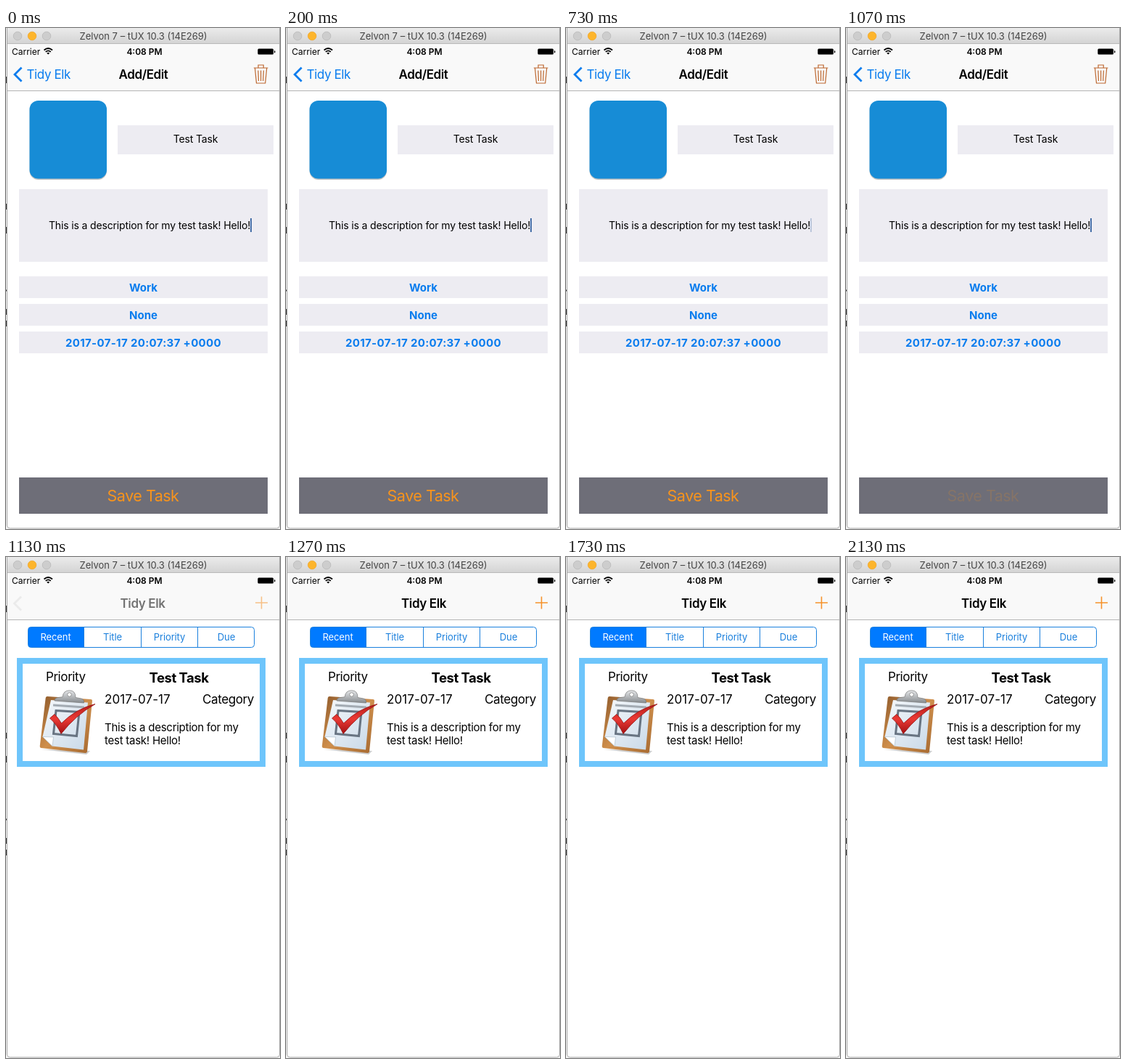
Recreate the animation shown at these times as an HTML page. Size 378x690 px, loop 2.19 s.

```html
<!DOCTYPE html>
<html lang="en">
<head>
<meta charset="utf-8">
<title>Task editor</title>
<style>
  html, body { margin: 0; width: 100%; height: 100%; overflow: hidden; background: #fff; }
  svg { display: block; width: 378px; height: 690px; font-family: Inter, Roboto, sans-serif; }
  .mid { text-anchor: middle; }
  .end { text-anchor: end; }
  .nav { font-size: 17px; letter-spacing: -.4px; }
  .strong { font-weight: 600; }
  .body { font-size: 14px; letter-spacing: -.14px; }
  .pick { font-size: 15px; font-weight: 700; fill: #087cee; }
  .field { fill: #edecf2; }
  .tab { font-size: 13px; letter-spacing: -.1px; fill: #1a7fdc; }
  .cell { font-size: 17px; letter-spacing: -.4px; }
  .note { font-size: 15px; letter-spacing: -.25px; }

  .loop { animation: 2190ms step-end infinite; }
  #form { animation-name: form; }
  #list { animation-name: list; }
  #save { animation-name: press; }
  #page { animation-name: slide; }
  #title { animation-name: title; }
  #add { animation-name: add; }
  #ghost { animation-name: ghost; }
  #caret { animation-name: caret; animation-timing-function: linear; }

  @keyframes form { 0% { visibility: visible; } 51.598%, 100% { visibility: hidden; } }
  @keyframes list { 0% { visibility: hidden; } 51.598%, 100% { visibility: visible; } }
  @keyframes press { 0% { opacity: 1; } 48.858%, 100% { opacity: .18; } }
  @keyframes caret {
    0%, 9.13% { opacity: 1; }
    18.26% { opacity: .12; }
    21.46%, 30.6% { opacity: 0; }
    39.7%, 100% { opacity: 1; }
  }
  /* tail of the pop transition */
  @keyframes slide {
    0% { transform: translateX(-3px); }
    54.795% { transform: translateX(-1px); }
    57.991%, 100% { transform: none; }
  }
  @keyframes title {
    0% { opacity: .54; transform: translateX(-1.5px); }
    54.795% { opacity: .88; transform: translateX(-.5px); }
    57.991%, 100% { opacity: 1; transform: none; }
  }
  @keyframes add { 0% { opacity: .55; } 54.795% { opacity: .88; } 57.991%, 100% { opacity: 1; } }
  @keyframes ghost { 0% { opacity: .08; } 54.795%, 100% { opacity: 0; } }
</style>
</head>
<body>
<svg viewBox="0 0 378 690">
  <defs>
    <linearGradient id="bar" x2="0" y2="1">
      <stop stop-color="#ebebeb"/><stop offset="1" stop-color="#d3d3d3"/>
    </linearGradient>
    <linearGradient id="wood" x2="1" y2="1">
      <stop stop-color="#8f5a2b"/><stop offset=".5" stop-color="#cf8f4c"/><stop offset="1" stop-color="#a5682f"/>
    </linearGradient>
    <linearGradient id="paper" x2="1" y2="1">
      <stop stop-color="#f5f8fb"/><stop offset="1" stop-color="#c9d9e8"/>
    </linearGradient>
    <linearGradient id="metal" x2="0" y2="1">
      <stop stop-color="#e6e8ea"/><stop offset="1" stop-color="#85898d"/>
    </linearGradient>
    <linearGradient id="red" x2="0" y2="1">
      <stop stop-color="#b81c1a"/><stop offset=".5" stop-color="#ea3a35"/><stop offset="1" stop-color="#a31012"/>
    </linearGradient>
  </defs>

  <!-- desktop slivers and window -->
  <rect width="378" height="690" fill="#f6f6f6"/>
  <path d="M0 67v9M0 242v8M0 274v9M0 361.5h1M0 387v8M0 403v8" stroke="#333" stroke-width="2"/>
  <rect x="1.5" y="-4" width="376" height="693" rx="4" fill="#fff" stroke="#a9a9a9"/>
  <rect x="2" width="375" height="22" fill="url(#bar)"/>
  <path d="M2 21.5h375" stroke="#b9b9b9"/>
  <g stroke-width=".8">
    <circle cx="16" cy="11" r="5.8" fill="#cdcdcd" stroke="#b9b9b9"/>
    <circle cx="36" cy="11" r="5.8" fill="#fdb52c" stroke="#f0a82c"/>
    <circle cx="56" cy="11" r="5.8" fill="#cdcdcd" stroke="#b9b9b9"/>
  </g>
  <text class="mid" x="189.5" y="16" font-size="13" fill="#454545">Zelvon 7 – tUX 10.3 (14E269)</text>

  <!-- status and navigation bars -->
  <rect x="2" y="22" width="375" height="64" fill="#f9f9f9"/>
  <path d="M2 86.5h375" stroke="#b4b4b4"/>
  <text x="8" y="36.5" font-size="12">Carrier</text>
  <path d="M52.5 30.5Q58.2 25.5 64 30.5M54.7 32.9Q58.2 29.9 61.8 32.9" fill="none" stroke="#000" stroke-width="1.7"/>
  <path d="M58.2 36.5l-2-2q2-1.6 4 0z"/>
  <text class="mid strong" x="191" y="36.5" font-size="12">4:08 PM</text>
  <rect x="347.3" y="28.4" width="21.7" height="8.2" rx="1.5"/>
  <path d="M370 31v3.5q1.5-.3 1.5-1.75T370 31"/>

  <g id="form" class="loop">
    <path d="M21.5 54.5L12 64l9.5 9.5" fill="none" stroke="#087cee" stroke-width="2.8"/>
    <text class="nav" x="28.5" y="70" fill="#087cee">Tidy Elk</text>
    <text class="nav strong mid" x="189.5" y="70">Add/Edit</text>
    <g fill="none" stroke="#bd672f" stroke-width="1.2">
      <path d="M341.8 55h19.6M348 54.5v-3.5h7.2v3.5M343.5 55.5l2 20.5h12.200l2-20.5"/>
      <path d="M347.800 58.5l.7 14.5M351.600 58.5V73M355.400 58.5l-.7 14.5"/>
    </g>

    <rect x="32.5" y="101.5" width="106.5" height="107.5" rx="12" fill="#999" opacity=".6"/>
    <rect x="32.5" y="100" width="106.5" height="107.5" rx="12" fill="#178cd6"/>

    <g class="field">
      <rect x="154" y="134" width="215" height="40"/>
      <rect x="18" y="222" width="343" height="100"/>
      <rect x="18" y="342" width="343" height="30"/>
      <rect x="18" y="380" width="343" height="30"/>
      <rect x="18" y="418" width="343" height="30"/>
    </g>
    <text class="body mid" x="261.5" y="158">Test Task</text>
    <text class="body mid" x="198" y="276.5">This is a description for my test task! Hello!</text>
    <rect id="caret" class="loop" x="337" y="262" width="2" height="19" fill="#466fa8"/>
    <g class="pick mid">
      <text x="189.5" y="362.5">Work</text>
      <text x="189.5" y="400.5">None</text>
      <text x="189.5" y="438.5" letter-spacing=".35">2017-07-17 20:07:37 +0000</text>
    </g>
    <rect x="18" y="619" width="343" height="50" fill="#6e6e78"/>
    <text id="save" class="loop mid" x="189" y="652" font-size="21.5" letter-spacing="-.5" fill="#f8941c">Save Task</text>
  </g>

  <g id="list" class="loop">
    <path id="ghost" class="loop" d="M21 54.5L11.5 64l9.5 9.5" fill="none" stroke="#555" stroke-width="2.8"/>
    <text id="title" class="loop nav strong mid" x="190" y="70">Tidy Elk</text>
    <path id="add" class="loop" d="M344 63h17M352.5 54.5v17" stroke="#f5922a" stroke-width="1.6"/>

    <g id="page" class="loop">
      <path d="M111 96.5H37.5a4 4 0 0 0-4 4v20a4 4 0 0 0 4 4H111z" fill="#007aff"/>
      <rect x="33.5" y="96.5" width="312" height="28" rx="4" fill="none" stroke="#1a80dd"/>
      <path d="M110.5 97v27M189.5 97v27M267.5 97v27" stroke="#1a80dd"/>
      <g class="tab mid">
        <text x="71.5" y="115" style="fill:#fff">Recent</text>
        <text x="150" y="115">Title</text>
        <text x="228.5" y="115">Priority</text>
        <text x="307" y="115">Due</text>
      </g>

      <rect x="22" y="143" width="335" height="142" fill="#fff" stroke="#6ec5fb" stroke-width="8"/>
      <text class="cell" x="58" y="171">Priority</text>
      <text class="mid" x="241.5" y="173" font-size="18.5" font-weight="700" letter-spacing="-.5">Test Task</text>
      <text class="cell" x="139" y="202" style="letter-spacing:.1px">2017-07-17</text>
      <text class="cell end" x="345" y="202">Category</text>
      <text class="note" x="139" y="240">This is a description for my</text>
      <text class="note" x="139" y="257.5">test task! Hello!</text>

      <!-- clipboard -->
      <path d="M52 265l62 7 5-5z" fill="#999" opacity=".5"/>
      <path d="M60 192l60 4q2 0 2 2l-7 70q-.5 2-2.5 2l-61-7q-2-.3-1.8-2.5l8-66.5q.3-2 2.3-2z" fill="url(#wood)"/>
      <path d="M65 197l51 3.5-6 65-43-5-13.5-13z" fill="url(#paper)"/>
      <path d="M53.5 247.5l15 .5-1.5 12.5z" fill="#fff" stroke="#aebdcb" stroke-width=".7"/>
      <path d="M68 204l43 3" stroke="#a3abb3" stroke-width="3"/>
      <path d="M72 211.5l32 2-3.5 33-32-3z" fill="none" stroke="#687482" stroke-width="3"/>
      <path d="M70 198q0-4 5-4.5l6-.7q1-9 9.5-9t8.5 9.7l8 1.5q4 1 3.5 6z" fill="url(#metal)" stroke="#777" stroke-width=".7"/>
      <circle cx="90.5" cy="189.5" r="2.7" fill="#fff" stroke="#777" stroke-width=".7"/>
      <path d="M63.5 222l6.5-5.5q5 5 9.5 12.5 20-20 46.5-26.5Q99 218 79 243.5q-6-13-15.5-21.5z" fill="url(#red)" stroke="#961313" stroke-width=".8"/>
    </g>
  </g>
</svg>
</body>
</html>
```
